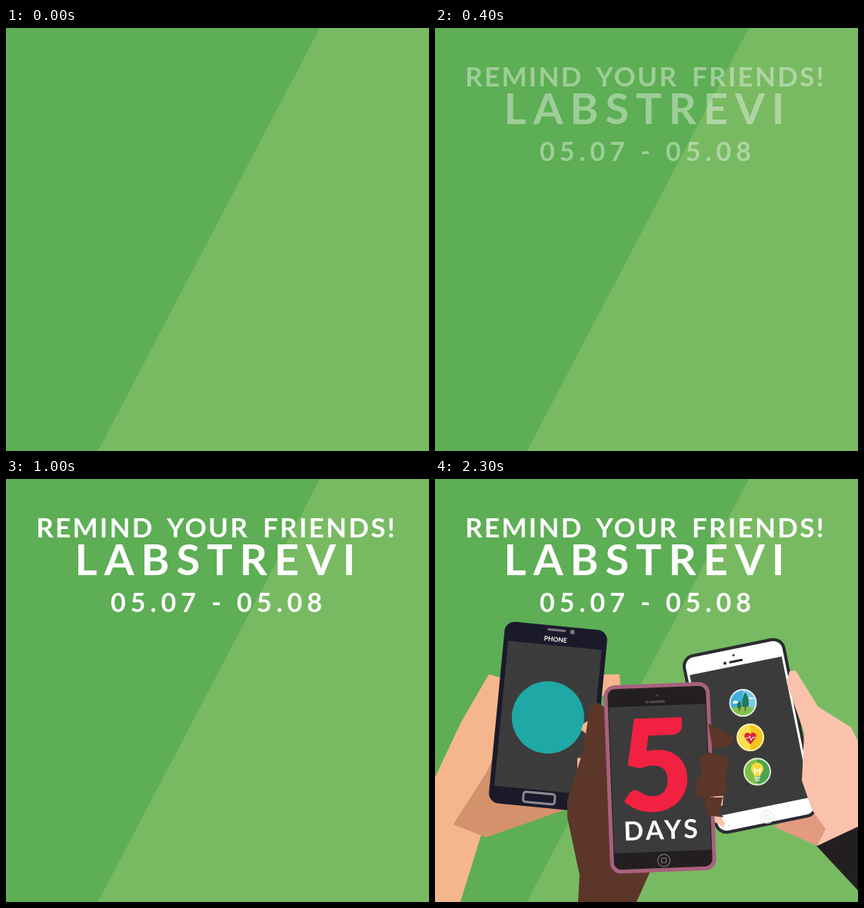
These frames come from a looping animation (550x550 px, 4300 ms). An HTML page:

```html
<!DOCTYPE html>
<html lang="en">
<head>
<meta charset="utf-8">
<title>Remind your friends</title>
<style>
  html, body { margin: 0; width: 100%; height: 100%; overflow: hidden; background: #5dae54; }
  svg { display: block; width: 100vw; height: 100vh; }
  text { font-family: Lato, sans-serif; font-weight: 700; fill: #fff; text-anchor: middle; }
  .line { fill: none; stroke-linecap: round; }
</style>
</head>
<body>
<svg viewBox="0 0 550 550">
  <path fill="#78ba62" d="M408 0H550V550H119.500Z"/>

  <g id="title" opacity="0">
    <text x="273.500" y="76" font-size="35" letter-spacing="2.3" word-spacing="7">REMIND YOUR FRIENDS!</text>
    <text x="276.500" y="125" font-size="56" letter-spacing="9">LABSTREVI</text>
    <text x="276.500" y="173" font-size="34" letter-spacing="6">05.07 - 05.08</text>
  </g>

  <g id="left" visibility="hidden">
    <g fill="#f6b68d">
      <path d="M0 388 34 316 70 254 88 259V340L67 382 24 449 60 463 33 550H0Z"/>
      <path d="M217 254H240L241 268 231 275 214 284Z"/>
    </g>
    <path fill="#d3926b" d="M90 330 67 382 24 449 66 466 175 428ZM222 389 204 404 207 388Z"/>
    <g transform="translate(147 309) rotate(5.5)">
      <rect x="-67" y="-118.500" width="134" height="237" rx="13" fill="#1b1a2b"/>
      <rect x="-61" y="-93" width="122" height="189" fill="#3d3c3c"/>
      <path class="line" stroke="#77777d" stroke-width="3" d="M-10-113H11"/>
      <circle cx="21" cy="-112.500" r="3" fill="#77777d"/>
      <text y="-98" font-size="8.5">PHONE</text>
      <rect x="-22" y="100" width="41" height="13" rx="3" class="line" stroke="#8a8b8f" stroke-width="3"/>
      <circle cy="1" r="47" fill="#1ea9a6"/>
    </g>
    <path fill="#f6b68d" d="M193 318 213 306 223 310V333L205 338 190 326ZM185 363 206 360 216 370 222 389 211 391 199 380 185 381Z"/>
  </g>

  <g id="right" visibility="hidden">
    <path fill="#e29a80" d="M440 452 495 425 509 455 497 477Z"/>
    <path fill="#231f20" d="M496 477 550 451V535Z"/>
    <g transform="translate(409.500 334) rotate(-11.5)">
      <rect x="-66" y="-117" width="132" height="234" rx="14" fill="#fff" stroke="#2b2b31" stroke-width="4"/>
      <rect x="-61" y="-93" width="122" height="187" fill="#3c3b3b"/>
      <path class="line" stroke="#2b2b31" stroke-width="3" d="M-6-99H9"/>
      <circle cx="-13" cy="-99" r="2" fill="#2b2b31"/>
      <circle cy="-107" r="1.500" fill="#2b2b31"/>
      <circle cx="1" cy="108" r="8" class="line" stroke="#e2e2e2"/>
      <rect x="-2" y="105" width="6" height="6" rx="1" class="line" stroke="#e2e2e2"/>
    </g>
    <g transform="translate(400.500 291)">
      <circle r="17.500" fill="#3fb1da"/>
      <path fill="#7ccbe8" d="M0-17A17 17 0 0 1 0 17Z"/>
      <path fill="#fff" d="M-13 1a3 3 0 0 1 5-3 3 3 0 0 1 4 3ZM7-5a3 3 0 0 1 5-1 2 2 0 0 1 3 1Z"/>
      <path fill="#82c34c" d="M-16 7Q0 2 16 7A17 17 0 0 1-16 7Z"/>
      <path fill="#20785a" d="M3-14Q9-5 7 5H-1Q-2-6 3-14ZM-5-3Q-1 2-3 7H-7Q-9 2-5-3Z"/>
      <path class="line" stroke="#6a4c35" stroke-width="1.500" d="M3 4V10M-5 6V10"/>
      <circle r="17" class="line" stroke="#e2f1ee" stroke-width="1.800"/>
    </g>
    <g transform="translate(410 336)">
      <circle r="17.500" fill="#f9df50"/>
      <path fill="#f2c61c" d="M0-17A17 17 0 0 1 0 17Z"/>
      <path fill="#d9253c" d="M0 9-7 1C-10-5-3-9 0-4 3-9 10-5 7 1Z"/>
      <path class="line" stroke="#fff" d="M-7 1H-3L-1-2 1 4 3 0H7"/>
      <circle r="17" class="line" stroke="#fff2b5" stroke-width="1.800"/>
    </g>
    <g transform="translate(419 380.500)">
      <circle r="17.500" fill="#80c247"/>
      <path fill="#4ba350" d="M0-17A17 17 0 0 1 0 17Z"/>
      <path fill="#f8d93c" d="M-4 6Q-4 3-7 0A8 8 0 1 1 7 0Q4 3 4 6Z"/>
      <path class="line" stroke="#fff" stroke-width="1.500" d="M-3 3-4-4 0 0 4-4 3 3"/>
      <path class="line" stroke="#e8e8e0" stroke-width="2" d="M-3 8H3M-2 11H2"/>
      <circle r="17" class="line" stroke="#e0f0d2" stroke-width="1.800"/>
    </g>
    <g fill="#fac2ab">
      <path d="M457 264 461 250 469 249 498 296 541 323 550 341V452L497 477 508 455 490 430 477 392 480 330Z"/>
      <path d="M334 346 340 340 355 350 358 368 370 375 367 400 375 406 374 424 365 428 377 448 375 453 345 434 346 424 352 418 347 407 338 402 337 378 341 371 335 362Z"/>
    </g>
  </g>

  <g id="front" visibility="hidden">
    <path fill="#5c3729" d="M204 294 212 291 221 297 228 500 280 510 262 550H186L188 515 172 440V418L193 352 200 305Z"/>
    <g transform="translate(292.500 388.500) rotate(-2.2)">
      <rect x="-66.500" y="-120" width="133" height="240" rx="12" fill="#231f20" stroke="#a8617e" stroke-width="5"/>
      <rect x="-63" y="-94" width="126" height="190" fill="#3c3b3b"/>
      <path class="line" stroke="#4a4748" stroke-width="3" d="M-9-99H9"/>
      <circle cx="-13" cy="-99" r="2" fill="#4a4748"/>
      <circle cy="-107" r="1.500" fill="#4a4748"/>
      <circle cx="1" cy="107.500" r="8" class="line" stroke="#858283"/>
      <rect x="-2" y="104.500" width="6" height="6" rx="1" class="line" stroke="#858283"/>
      <text x="-5" y="43" font-size="166" style="fill:#f22142;font-weight:900">5</text>
      <text y="80" font-size="34" letter-spacing="3.5">DAYS</text>
    </g>
    <path fill="#5c3729" d="M355 318 376 328 389 338 382 347 361 350ZM345 362 355 355 380 362 383 373 376 388H347ZM341 388H378L380 400 376 412 339 414ZM350 414H374L370 432 375 440 353 437Z"/>
  </g>
</svg>
<script>
  const LOOP = 4300;
  const entries = { left: 1400, right: 1800, front: 2300 };
  const byId = id => document.getElementById(id);

  function draw() {
    const t = performance.now() % LOOP;
    // The title fades in by tenths; each phone then pops in.
    byId('title').setAttribute('opacity', Math.min(Math.floor(t / 100) / 10, 1));
    for (const [id, start] of Object.entries(entries))
      byId(id).setAttribute('visibility', t >= start ? 'visible' : 'hidden');
    requestAnimationFrame(draw);
  }
  draw();
</script>
</body>
</html>
```
